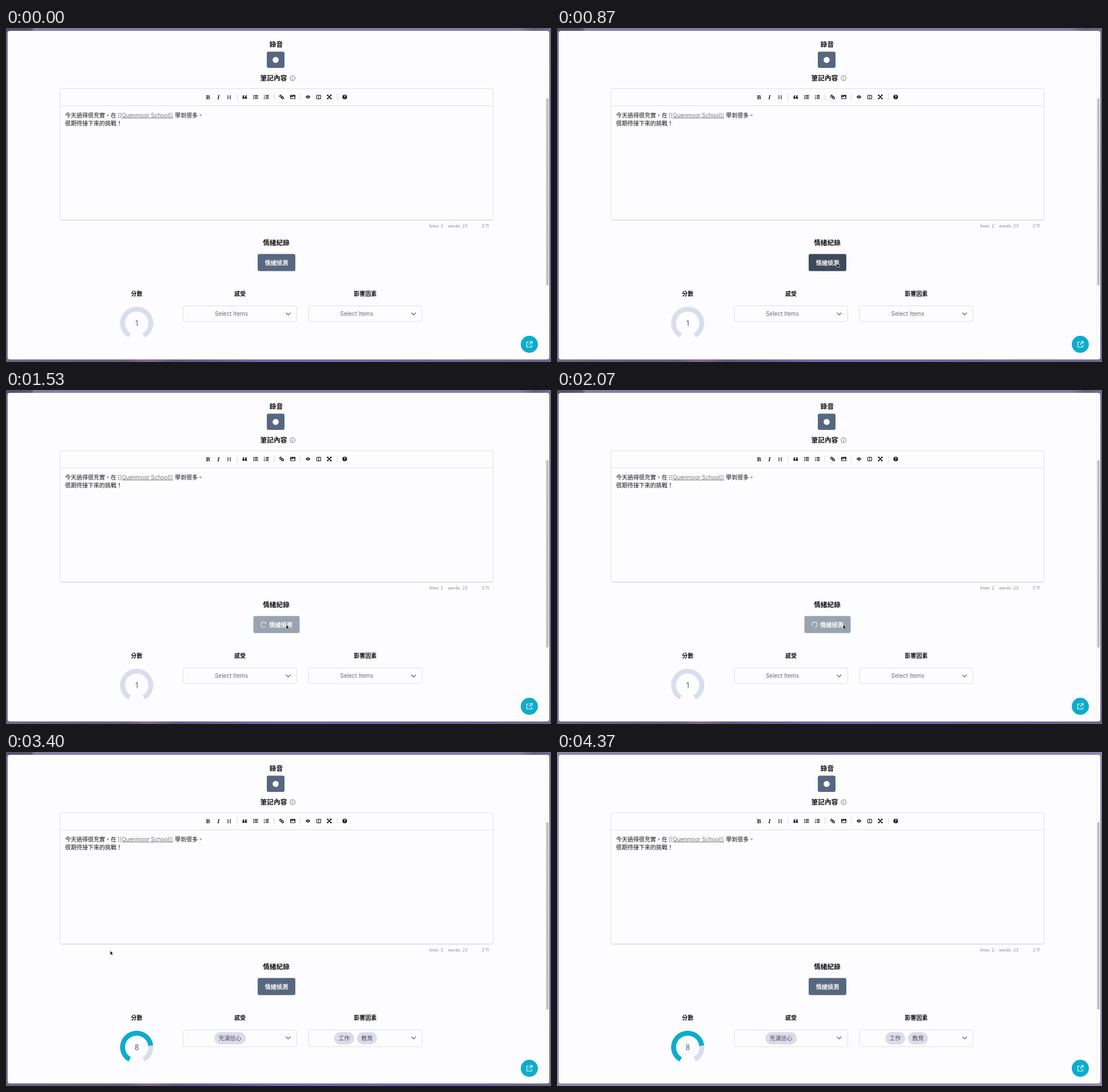
Write an HTML page that moves like this. It is 955 px wide and 586 px high and loops after 4430 ms.

```html
<!DOCTYPE html>
<html lang="zh-Hant">
<head>
<meta charset="utf-8">
<style>
html, body { margin: 0; width: 100%; height: 100%; overflow: hidden; }
svg { display: block; width: 955px; height: 586px; }
text { font: 500 10px Inter, "Noto Sans CJK TC", "Noto Sans CJK", sans-serif; fill: #111; white-space: pre; }
.mid { text-anchor: middle; }
.head { font-size: 11.7px; font-weight: 700; }
.label { font-weight: 700; }
.hint { font-weight: 400; fill: #666b75; }
.status { font-size: 7.3px; font-weight: 400; fill: #85878c; }
.serif { font: 700 10.5px "Liberation Serif", serif; text-anchor: middle; }
.line { fill: none; stroke: #111; }
.box { fill: #fdfdff; stroke: #dcdee8; }
.chip { fill: #dadce9; }
.white { fill: none; stroke: #fff; }
</style>
</head>
<body>
<svg viewBox="0 0 955 586">
  <defs>
    <linearGradient id="topEdge">
      <stop offset="0" stop-color="#55506a"/><stop offset=".046" stop-color="#5c566f"/>
      <stop offset=".052" stop-color="#857da5"/><stop offset=".94" stop-color="#857da5"/>
      <stop offset=".97" stop-color="#655f80"/><stop offset="1" stop-color="#746d92"/>
    </linearGradient>
    <linearGradient id="bottomEdge">
      <stop offset="0" stop-color="#6c668a"/><stop offset=".22" stop-color="#625c80"/>
      <stop offset=".26" stop-color="#84688d"/><stop offset=".31" stop-color="#5f5a84"/>
      <stop offset=".5" stop-color="#7768a8"/><stop offset=".75" stop-color="#6f659b"/>
      <stop offset="1" stop-color="#6c668a"/>
    </linearGradient>
  </defs>

  <rect width="955" height="586" fill="#736c90"/>
  <rect width="955" height="6" fill="url(#topEdge)"/>
  <rect y="580" width="955" height="6" fill="url(#bottomEdge)"/>
  <rect id="paleEdge" width="955" height="586" fill="#8e87ad"/>
  <rect x="3" y="5" width="949" height="576.5" rx="4" fill="#fdfdff"/>
  <path d="M945.5 8V578" stroke="#eeeee4" stroke-dasharray="3 2"/>
  <rect x="946.5" y="123" width="4.5" height="329" rx="2.2" fill="#c1c1c4"/>

  <text class="head mid" x="473.5" y="33.2">錄音</text>
  <rect x="457" y="41.5" width="31" height="28.5" rx="3" fill="#576780"/>
  <circle cx="472.5" cy="56" r="5.3" fill="#fff"/>
  <text class="head mid" x="469" y="92.2">筆記內容</text>
  <circle cx="502.2" cy="88" r="4.4" fill="none" stroke="#555" stroke-width=".8"/>
  <path d="M502.2 87.3v3.2M502.2 85.3v1" stroke="#555" stroke-width=".9"/>

  <rect class="box" x="94.5" y="106.5" width="759" height="230.5" rx="3"/>
  <path d="M95 136.5H853" stroke="#dddfeb"/>
  <path d="M97 337H853" stroke="#c9cad2" stroke-dasharray="2 1"/>
  <path d="M405.5 115v12M469.5 115v12M515.5 115v12M580.5 115v12" stroke="#d9d9dd"/>

  <text class="serif" x="354" y="125">B</text>
  <text class="serif" x="372.3" y="125" font-style="italic" style="font-style:italic">I</text>
  <text class="serif" x="391" y="125" style="font-weight:400">H</text>
  <g fill="#111">
    <path id="quote" d="M414.5 124.3v-3.2q0-2.8 3-3v1.3q-1.3.2-1.3 1.6h1.6v3.3z"/>
    <use href="#quote" x="4.3"/>
    <path d="M433 117.8h1.7v1.5H433zm0 2.6h1.7v1.5H433zm0 2.6h1.7v1.5H433z"/>
    <path d="M498 117.5h9v7h-9z"/>
    <path d="M525 121q4-6.2 8.2 0q-4.200 6.200-8.200 0z"/>
    <circle cx="593.500" cy="121" r="4"/>
  </g>
  <path class="line" d="M435.700 118.500h5.800m-5.800 2.600h5.800m-5.800 2.600h5.800M455 118.500h5.500m-5.500 2.600h5.500m-5.500 2.600h5.500" stroke-width="1.300"/>
  <path class="line" d="M452.700 117.300v2.500m-.8 1.400h1.500l-1.300 1.500 1.300 1.600h-1.500" stroke-width=".8"/>
  <g class="line" stroke-width="1.300">
    <rect x="479.500" y="118.200" width="4" height="3.200" rx="1.500" transform="rotate(40 481.500 119.800)"/>
    <rect x="482.500" y="120.800" width="4" height="3.200" rx="1.500" transform="rotate(40 484.500 122.400)"/>
  </g>
  <path d="M499 123.500v-1.500l1.500-1.500 1.200 1 2.200-2.300 2.100 2.300v2z" fill="#fff"/>
  <circle cx="500.300" cy="119" r=".8" fill="#fff"/>
  <circle class="line" cx="529.100" cy="121" r="1.500" style="stroke:#fff" stroke-width=".7"/>
  <path class="line" d="M544.500 118h7v6.300h-7zM548 118v6.300" stroke-width="1"/>
  <path class="line" d="M563.500 118l6 6m0-6l-6 6" stroke-width="1.500"/>
  <path d="M562.500 117h3l-3 3zm8 0h-3l3 3zm-8 8h3l-3-3zm8 0h-3l3-3z" fill="#111"/>
  <text class="mid" x="593.500" y="123.500" style="font-size:7px;font-weight:700;fill:#fff">?</text>

  <text x="103.500" y="156.500">今天過得很充實，在</text>
  <text x="196" y="156.500" style="font-size:9.700px;font-weight:400;fill:#74777c">[[<tspan text-decoration="underline">Quenmoor School]]</tspan></text>
  <text x="296" y="156.500">學到很多。</text>
  <text x="103.500" y="170.500">很期待接下來的挑戰！</text>
  <text class="status" x="741.700" y="350">lines: 2</text>
  <text class="status" x="774.500" y="350">words: 23</text>
  <text class="status" x="833.500" y="350">2:11</text>

  <text class="head mid" x="473.500" y="381">情緒紀錄</text>
  <rect id="button" y="396.500" height="30" rx="3"/>
  <text id="buttonText" class="label" y="415.500" style="fill:#fff;font-size:10.200px">情緒偵測</text>
  <circle id="spinner" class="white" cx="451.500" cy="411.700" r="4.600" stroke-width="1.100" pathLength="360" stroke-dasharray="290 70"/>

  <text class="label mid" x="229" y="470.300">分數</text>
  <text class="label mid" x="410" y="470.300">感受</text>
  <text class="label mid" x="629.500" y="470.300">影響因素</text>
  <g fill="none" stroke-width="8.600">
    <path id="track" stroke="#d9deec"/>
    <path id="value" stroke="#0caccb"/>
  </g>
  <text id="score" class="mid" x="229" y="522.500" style="font-size:12.500px;font-weight:400;fill:#555a64"></text>

  <rect class="box select" x="310.500" y="487.500" width="199" rx="3"/>
  <rect class="box select" x="530" y="487.500" width="199" rx="3"/>
  <path class="line" d="M490.500 499.500l4 4 4-4M710.200 499.500l4 4 4-4" style="stroke:#5d626b" stroke-width="1.200"/>
  <g id="empty">
    <text class="hint mid" x="395" y="504.800">Select Items</text>
    <text class="hint mid" x="614.700" y="504.800">Select Items</text>
  </g>
  <g id="chips"></g>

  <circle cx="917" cy="555" r="15" fill="#0caccb"/>
  <path class="white" d="M916.500 551h-4v8.700h8.700v-4M918 550h4v4M922 550l-5.500 5.500" stroke-width="1.100"/>

  <g id="cursor">
    <path id="arrow" d="M0 0V7.300L1.700 5.800 2.800 8.400 4 7.900 2.900 5.300H5.200Z" fill="#000" stroke="#fff" stroke-width=".5"/>
    <path id="hand" d="M-1 .3q0-1 .7-1t.8 1V2.600L3.600 3.300q.8.300.6 1.200L3.600 7.500H-.1L-2.300 4.500q-.2-1 .7-.8L-1 4.300Z" fill="#111" stroke="#fff" stroke-width=".8"/>
  </g>
</svg>
<script>
const LOOP = 4430, HOVER = 650, CLICK = 1100, DONE = 3100, END = 4300;
const $ = id => document.getElementById(id);
const set = (el, attrs) => { for (const k in attrs) el.setAttribute(k, attrs[k]); };
const show = (id, on) => $(id).style.display = on ? "" : "none";
const clamp = v => Math.max(0, Math.min(1, v));

// Cursor stops: time, x, y
const path = [
  [100, 590, 592], [700, 491, 412], [1600, 491, 412], [2070, 501.5, 412],
  [2250, 507, 412], [2750, 555.5, 415], [3190, 555.5, 415], [3390, 182.7, 348.7]
];

function cursorAt(t) {
  const i = path.findIndex(p => p[0] > t);
  if (i < 0) return path[path.length - 1].slice(1);
  if (i === 0) return path[0].slice(1);
  const [a, b] = [path[i - 1], path[i]];
  const u = (t - a[0]) / (b[0] - a[0]), e = u * u * (3 - 2 * u);
  return [a[1] + (b[1] - a[1]) * e, a[2] + (b[2] - a[2]) * e];
}

// The dial sweeps 300 degrees clockwise, open at the bottom
function dial(from, to) {
  const r = 24.7;
  const at = f => {
    const a = (f * 300 - 240) * Math.PI / 180;
    return `${229 + r * Math.cos(a)} ${518 + r * Math.sin(a)}`;
  };
  return `M${at(from)}A${r} ${r} 0 ${(to - from) * 300 > 180 ? 1 : 0} 1 ${at(to)}`;
}

const mix = (a, b, u) => `rgb(${a.map((v, i) => Math.round(v + (b[i] - v) * u))})`;

set($("track"), { d: dial(0, 1) });
set($("value"), { d: dial(0, 7 / 9) });
$("chips").innerHTML = [[365, 55, "充滿信心"], [575, 35, "工作"], [615, 35, "教育"]].map(([x, w, label]) =>
  `<rect class="chip" x="${x}" y="491.5" width="${w}" height="21.500" rx="10.700"/>
   <text class="mid" x="${x + w / 2}" y="506" style="fill:#4b505a;font-weight:400">${label}</text>`).join("");

function draw(t) {
  const loading = t >= CLICK && t < DONE, done = t >= DONE;
  const width = loading ? 81 : 66;
  const hover = t < CLICK ? clamp((t - HOVER) / 150) : 0;
  set($("button"), {
    x: 474 - width / 2, width,
    fill: loading ? "#9aa3af" : mix([87, 103, 128], [62, 73, 91], hover)
  });
  set($("buttonText"), { x: loading ? 461 : 453.5 });
  show("spinner", loading);
  set($("spinner"), { transform: `rotate(${(t - 1530) * 0.18 + 53} 451.5 411.7)` });

  show("value", done);
  show("chips", done);
  show("empty", !done);
  $("score").textContent = done ? 8 : 1;
  document.querySelectorAll(".select").forEach(s => set(s, { height: done ? 29.5 : 27.5 }));

  const [x, y] = cursorAt(t), pointing = t >= HOVER && t < CLICK;
  show("cursor", t >= 100 && t < END);
  set($("cursor"), { transform: `translate(${x} ${y})` });
  show("arrow", !pointing);
  show("hand", pointing);
  show("paleEdge", t >= END);
}

const start = performance.now();
function tick() {
  draw((performance.now() - start) % LOOP);
  requestAnimationFrame(tick);
}
tick();
</script>
</body>
</html>
```
